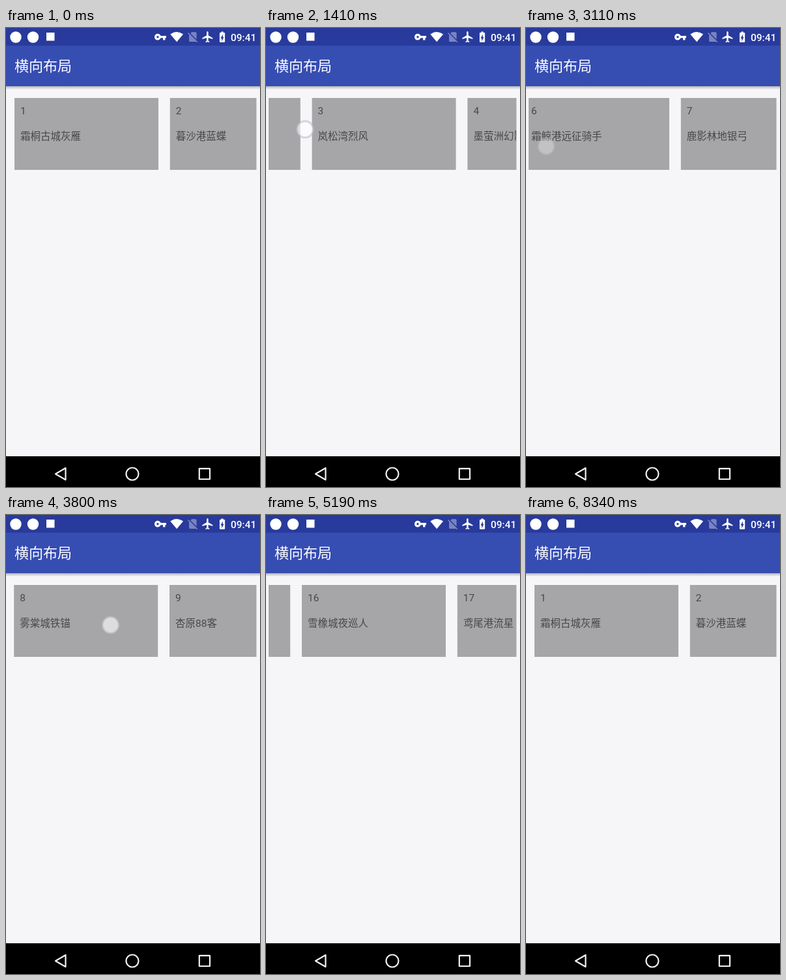
An HTML page for the animation above (8420 ms loop, 390x702 px).

```html
<!DOCTYPE html>
<html lang="zh-CN">
<head>
<meta charset="utf-8">
<title>横向布局</title>
<style>
  html, body { margin: 0; width: 100%; height: 100%; overflow: hidden; background: #f6f5f8; }
  svg { display: block; width: 390px; height: 702px; }
  text { font-family: Roboto, "Noto Sans CJK SC", "Noto Sans CJK", sans-serif; }
  .title { font-size: 22px; fill: #fff; }
  .clock { font-size: 15.5px; font-weight: 500; fill: #fff; }
  .card rect { fill: #a6a5a7; }
  .card text { font-size: 15.5px; fill: #48474a; }
  .nav { fill: none; stroke: #f2f2f2; stroke-width: 2.2; stroke-linejoin: round; }
  #touch { fill: rgba(255, 255, 255, .62); stroke: rgba(188, 183, 203, .55); stroke-width: 3; }
</style>
</head>
<body>
<svg viewBox="0 0 390 702">
  <defs>
    <clipPath id="list"><rect x="4" y="100" width="380.5" height="124"/></clipPath>
    <linearGradient id="shade" x2="0" y2="1">
      <stop offset="0" stop-opacity=".32"/>
      <stop offset="1" stop-opacity="0"/>
    </linearGradient>
  </defs>

  <rect width="390" height="702" fill="#f6f5f8"/>
  <rect y="88" width="390" height="6" fill="url(#shade)"/>
  <rect width="390" height="89" fill="#364db2"/>
  <rect width="390" height="27" fill="#283a9b"/>
  <text class="title" x="13" y="66">横向布局</text>

  <g fill="#fff">
    <circle cx="15" cy="14" r="8.7"/>
    <circle cx="41.5" cy="14" r="8.7"/>
    <rect x="62" y="7" width="12.5" height="12.5"/>
    <path transform="translate(227.2 3.8) scale(.82)" d="M12.65 10C11.83 7.67 9.61 6 7 6c-3.31 0-6 2.69-6 6s2.69 6 6 6c2.61 0 4.83-1.67 5.65-4H17v4h4v-4h2v-4H12.65zM7 14c-1.1 0-2-.9-2-2s.9-2 2-2 2 .9 2 2-.9 2-2 2z"/>
    <path d="M252.3 9.6Q262.2 2.4 272.1 9.6L262.2 21.3z"/>
    <path opacity=".38" transform="translate(277 3.8) scale(.82)" d="M18.99 5c0-1.1-.89-2-1.99-2h-7L7.66 5.34 19 16.68 18.99 5zM3.65 3.88L2.38 5.15 5 7.77V19c0 1.1.9 2 2 2h10.01c.35 0 .67-.1.96-.26l1.88 1.88 1.27-1.27L3.65 3.88z"/>
    <path transform="translate(299.7 3.6) scale(.84)" d="M21 16v-2l-8-5V3.5c0-.83-.67-1.5-1.5-1.5S10 2.67 10 3.5V9l-8 5v2l8-2.5V19l-2 1.5V22l3.5-1 3.5 1v-1.5L13 19v-5.5l8 2.5z"/>
    <path transform="translate(322.2 3.8) scale(.82)" d="M15.67 4H14V2h-4v2H8.33C7.6 4 7 4.6 7 5.33v15.33C7 21.4 7.6 22 8.33 22h7.33c.74 0 1.34-.6 1.34-1.33V5.33C17 4.6 16.4 4 15.67 4zM11 20v-5.5H9L13 7v5.5h2L11 20z"/>
  </g>
  <text class="clock" x="345" y="19.5">09:41</text>

  <g clip-path="url(#list)"><g id="cards"></g></g>
  <circle id="touch" r="12.5"/>

  <rect y="655" width="390" height="47"/>
  <g class="nav">
    <path d="M76 682L91.5 673V691z"/>
    <circle cx="194" cy="682" r="9.5"/>
    <rect x="296.8" y="673.8" width="16.2" height="16.2"/>
  </g>
</svg>

<script>
const LOOP = 8420, PITCH = 238.8, FADE = 90;

const teams = [
  '霜桐古城灰雁', '暮沙港蓝蝶', '岚松湾烈风', '墨萤洲幻影', '霁柳城智者', '霜鲸港远征骑手',
  '鹿影林地银弓', '雾棠城铁锚', '杏原88客', '麦月原飞鹿', '瑚沙岬棕熊', '柠霞平原船长',
  '砾雪镇齿轮', '烟榆高地守望者', '青砂海岸白鹭', '雪橡城夜巡人', '鸢尾港流星', '沉松谷黑豹'
];

// Screen refreshes: first, last, count
const bursts = [
  [300, 1090, 11], [1160, 1950, 11], [2020, 2730, 10], [2880, 3700, 12],
  [3800, 4560, 11], [4660, 5500, 12], [6050, 6890, 12], [6970, 7200, 4]
];

// Finger down, finger up, x from, x to, y from, y to, fling end, resting scroll
const swipes = [
  [300, 680, 330, 130, 162, 152, 1160, 300],
  [1160, 1397, 180, 60, 163, 155, 2020, 690],
  [2020, 2250, 290, 70, 165, 170, 2730, 985],
  [2880, 3060, 200, 31, 170, 181, 3650, 1533],
  [3650, 3876, 300, 90, 165, 170, 4330, 2640],
  [4330, 4560, 265, 68, 158, 162, 5500, 3623],
  [6050, 6200, 70, 290, 165, 168, 6500, 2191],
  [6500, 6640, 110, 347, 165, 173, 7200, 0]
];

const cards = document.getElementById('cards');
const touch = document.getElementById('touch');
const clamp = v => Math.min(1, Math.max(0, v));
const mix = (a, b, p) => a + (b - a) * p;

cards.innerHTML = teams.map((name, i) => `
  <g class="card" transform="translate(${13 + i * PITCH} 107)">
    <rect width="221" height="110"/>
    <text x="9" y="25">${i + 1}</text>
    <text x="9" y="64">${name}</text>
  </g>`).join('');

// Snap time to the latest screen refresh
function snap(t) {
  const burst = bursts.filter(b => b[0] <= t + 8).pop();
  if (!burst) return 0;
  const [first, last, count] = burst;
  const step = (last - first) / (count - 1);
  return Math.min(last, first + Math.floor((t + 8 - first) / step) * step);
}

function pose(t) {
  let scroll = 0, x = 0, y = 0, alpha = 0;
  for (const [down, up, x0, x1, y0, y1, end, rest] of swipes) {
    if (t < down) break;
    const drag = clamp((t - down) / (up - down));
    x = mix(x0, x1, drag);
    y = mix(y0, y1, drag);
    alpha = clamp(1 - (t - up) / FADE);
    scroll += x0 - x;
    if (t > up) {
      const left = 1 - clamp((t - up) / (end - up));
      scroll = mix(scroll, rest, 1 - left * left);
    }
  }
  return { scroll, x, y, alpha };
}

function draw() {
  const { scroll, x, y, alpha } = pose(snap(performance.now() % LOOP));
  cards.setAttribute('transform', `translate(${-scroll} 0)`);
  touch.setAttribute('transform', `translate(${x} ${y})`);
  touch.setAttribute('opacity', alpha);
  requestAnimationFrame(draw);
}
draw();
</script>
</body>
</html>
```
